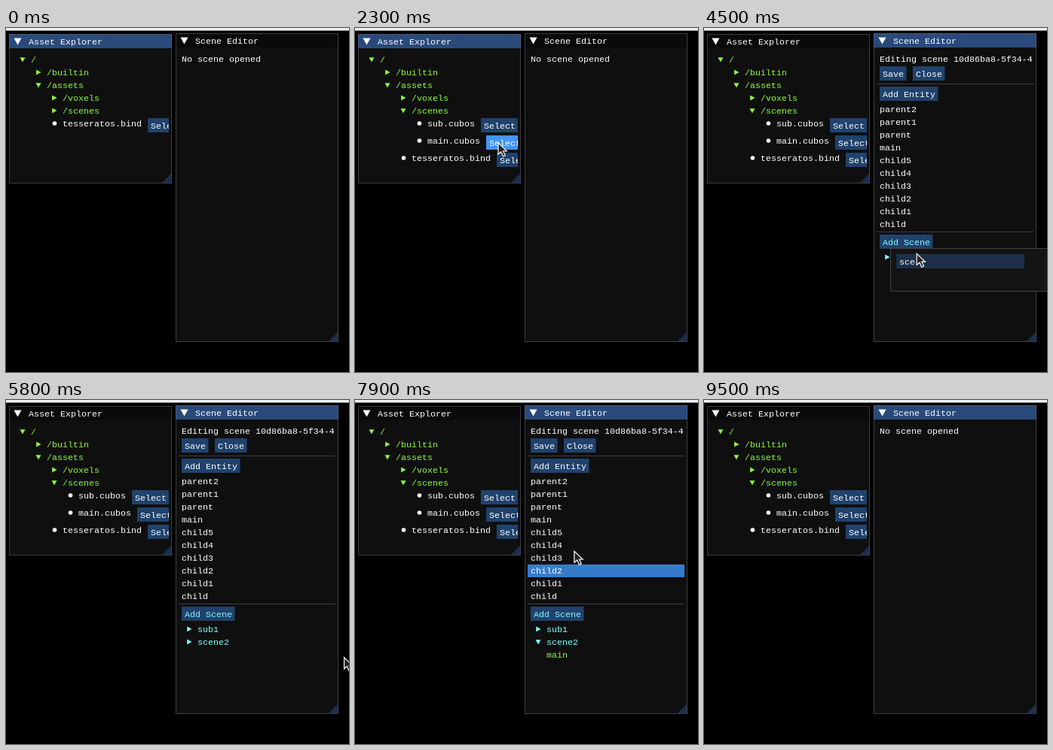
Animation of 455 by 458 pixels, one loop 9.9 s. Source, as an HTML page with a canvas:

```html
<!DOCTYPE html>
<html lang="en">
<head>
<meta charset="utf-8">
<title>Scene Editor</title>
<style>
html, body { margin: 0; width: 455px; height: 458px; overflow: hidden; background: #000; }
canvas { display: block; }
</style>
</head>
<body>
<canvas id="stage" width="455" height="458"></canvas>
<script>
const ctx = document.getElementById('stage').getContext('2d');
const LOOP = 9900, STEP = 100, CHAR = 7, LINE = 17, INDENT = 21;
const WHITE = '#fff', GREEN = '#8cfb40', CYAN = '#80ffff';
const BUTTON = '#20426c', BUTTON_HOT = '#4296fa', ROW_HOT = '#387bcb';
const BORDER = 'rgba(110, 110, 128, 0.5)';
const ENTITIES = 'parent2 parent1 parent main child5 child4 child3 child2 child1 child'.split(' ');

// Moments at which the interface changes, in ms.
const AT = { enter: 100, unfold: 1500, open: 2600, popup: 3800, type: 4300, add: 5400, expand: 6900, close: 9300 };

// The pointer rests between these moves.
const ENTRY = { x: 300, y: 376 };
const MOVES = [
  { from: AT.enter, to: 1200, x: 102, y: 110 },
  { from: AT.unfold, to: 2300, x: 190, y: 153 },
  { from: AT.open, to: 3400, x: 261, y: 296 },
  { from: 3500, to: 3700, x: 248, y: 292 },
  { from: AT.type, to: 5100, x: 467, y: 346 },
  { from: 5600, to: 6600, x: 290, y: 315 },
  { from: 7300, to: 8600, x: 292, y: 58 }
];

let pointer;

function pointerAt(t) {
  if (t < AT.enter || t >= AT.close) return null;
  return MOVES.reduce((p, move) => {
    const u = Math.min(1, Math.max(0, (t - move.from) / (move.to - move.from)));
    const k = u * u * (3 - 2 * u);
    return { x: p.x + (move.x - p.x) * k, y: p.y + (move.y - p.y) * k };
  }, ENTRY);
}

function hovered(x, y, w, h) {
  return pointer && pointer.x >= x && pointer.x < x + w && pointer.y >= y && pointer.y < y + h;
}

function rect(x, y, w, h, color) {
  ctx.fillStyle = color;
  ctx.fillRect(x, y, w, h);
}

function outline(x, y, w, h) {
  ctx.strokeStyle = BORDER;
  ctx.lineWidth = 1;
  ctx.strokeRect(x + 0.5, y + 0.5, w - 1, h - 1);
}

function polygon(points, color) {
  ctx.beginPath();
  points.forEach(([x, y]) => ctx.lineTo(x, y));
  ctx.closePath();
  ctx.fillStyle = color;
  ctx.fill();
}

// y is the middle of the line.
function text(label, x, y, color = WHITE) {
  ctx.fillStyle = color;
  ctx.fillText(label, x, y + 4);
}

function arrow(x, y, open, color, r = 3.5) {
  polygon(open
    ? [[x - r, y - r * 0.8], [x + r, y - r * 0.8], [x, y + r]]
    : [[x - r * 0.8, y - r], [x + r, y], [x - r * 0.8, y + r]], color);
}

function button(label, x, y, color = WHITE) {
  const w = label.length * CHAR + 7.5;
  rect(x, y, w, 19, hovered(x, y, w, 19) ? BUTTON_HOT : BUTTON);
  text(label, x + 4, y + 10, color);
}

function treeNode(label, x, y, right, open, color) {
  if (hovered(x, y - 7, right - x, 13)) rect(x, y - 7, right - x, 13, ROW_HOT);
  arrow(x + 10, y, open, color);
  text(label, x + INDENT, y, color);
}

function fileNode(label, x, y) {
  ctx.beginPath();
  ctx.arc(x + 10.5, y, 2.8, 0, 2 * Math.PI);
  ctx.fillStyle = WHITE;
  ctx.fill();
  text(label, x + INDENT, y);
  button('Select', x + INDENT + label.length * CHAR + 8, y - 7);
}

function drawWindow(title, x, y, w, h, focused, content) {
  const r = x + w - 1, b = y + h - 1;
  rect(x, y, w, h, '#0f0f0f');
  rect(x, y, w, 19, focused ? '#294a7a' : '#0a0a0a');
  polygon([[r, b - 12], [r, b], [r - 12, b]], '#1a2f4e');
  outline(x, y, w, h);
  arrow(x + 11.5, y + 9.5, true, WHITE, 5);
  text(title, x + 26, y + 10);
  ctx.save();
  ctx.beginPath();
  ctx.rect(x + 4, y + 20, w - 8, h - 21);
  ctx.clip();
  content();
  ctx.restore();
}

function assetTree(t) {
  const unfolded = t >= AT.unfold;
  let y = 42;
  const folder = (label, depth, open) => {
    treeNode(label, 12 + depth * INDENT, y, 212, open, GREEN);
    y += LINE;
  };
  const file = (label, depth) => {
    fileNode(label, 12 + depth * INDENT, y);
    y += 23;
  };
  folder('/', 0, true);
  folder('/builtin', 1, false);
  folder('/assets', 1, true);
  folder('/voxels', 2, false);
  folder('/scenes', 2, unfolded);
  if (unfolded) ['sub.cubos', 'main.cubos'].forEach(name => file(name, 3));
  file('tesseratos.bind', 2);
}

function sceneContent(t) {
  const left = 233;
  if (t < AT.open || t >= AT.close) return text('No scene opened', left, 41);
  text('Editing scene 10d86ba8-5f34-4', left, 41);
  button('Save', left, 51);
  button('Close', left + 44, 51);
  rect(left - 4, 74, 208, 1, BORDER);
  button('Add Entity', left, 78);
  ENTITIES.forEach((name, i) => {
    const y = 108 + i * LINE;
    if (hovered(left - 4, y - 8, 208, LINE)) rect(left - 4, y - 8, 208, LINE, ROW_HOT);
    text(name, left, y);
  });
  rect(left - 4, 271, 208, 1, BORDER);
  button('Add Scene', left, 275, CYAN);
  treeNode('sub1', left, 305, 433, false, CYAN);
  if (t >= AT.add) treeNode('scene2', left, 305 + LINE, 433, t >= AT.expand, CYAN);
  if (t >= AT.expand) text('main', left + INDENT, 305 + 2 * LINE, GREEN);
}

function namePopup(t) {
  rect(247, 293, 260, 58, '#141414');
  outline(247, 293, 260, 58);
  rect(255, 301, 170, 19, '#1d2f4a');
  text('scene2'.slice(0, Math.max(0, (t - AT.type) / STEP + 1)), 259, 311);
}

function drawPointer({ x, y }) {
  polygon([[0, 0], [0, 15], [3.8, 11.7], [6.5, 18], [9.3, 16.8], [6.7, 10.8], [11.3, 10.8]]
    .map(([dx, dy]) => [x + dx, y + dy]), '#222');
  ctx.strokeStyle = '#eee';
  ctx.lineWidth = 1.3;
  ctx.stroke();
}

function draw(t) {
  const sceneFocused = t >= AT.popup;
  const popupOpen = sceneFocused && t < AT.add;
  // Hover feedback trails the pointer by one step.
  pointer = popupOpen ? null : pointerAt(t - STEP);
  rect(0, 0, 455, 458, '#000');
  rect(0, 0, 455, 3.5, '#eef0f0');
  drawWindow('Asset Explorer', 4, 8, 216, 199, !sceneFocused, () => assetTree(t));
  drawWindow('Scene Editor', 225, 7, 216, 411, sceneFocused, () => sceneContent(t));
  if (popupOpen) namePopup(t);
  const tip = pointerAt(t);
  if (tip) drawPointer(tip);
}

ctx.font = '11.667px "Liberation Mono", monospace';
const start = performance.now();
function frame() {
  const t = (performance.now() - start) % LOOP;
  draw(Math.floor(t / STEP) * STEP);
  requestAnimationFrame(frame);
}
frame();
</script>
</body>
</html>
```
